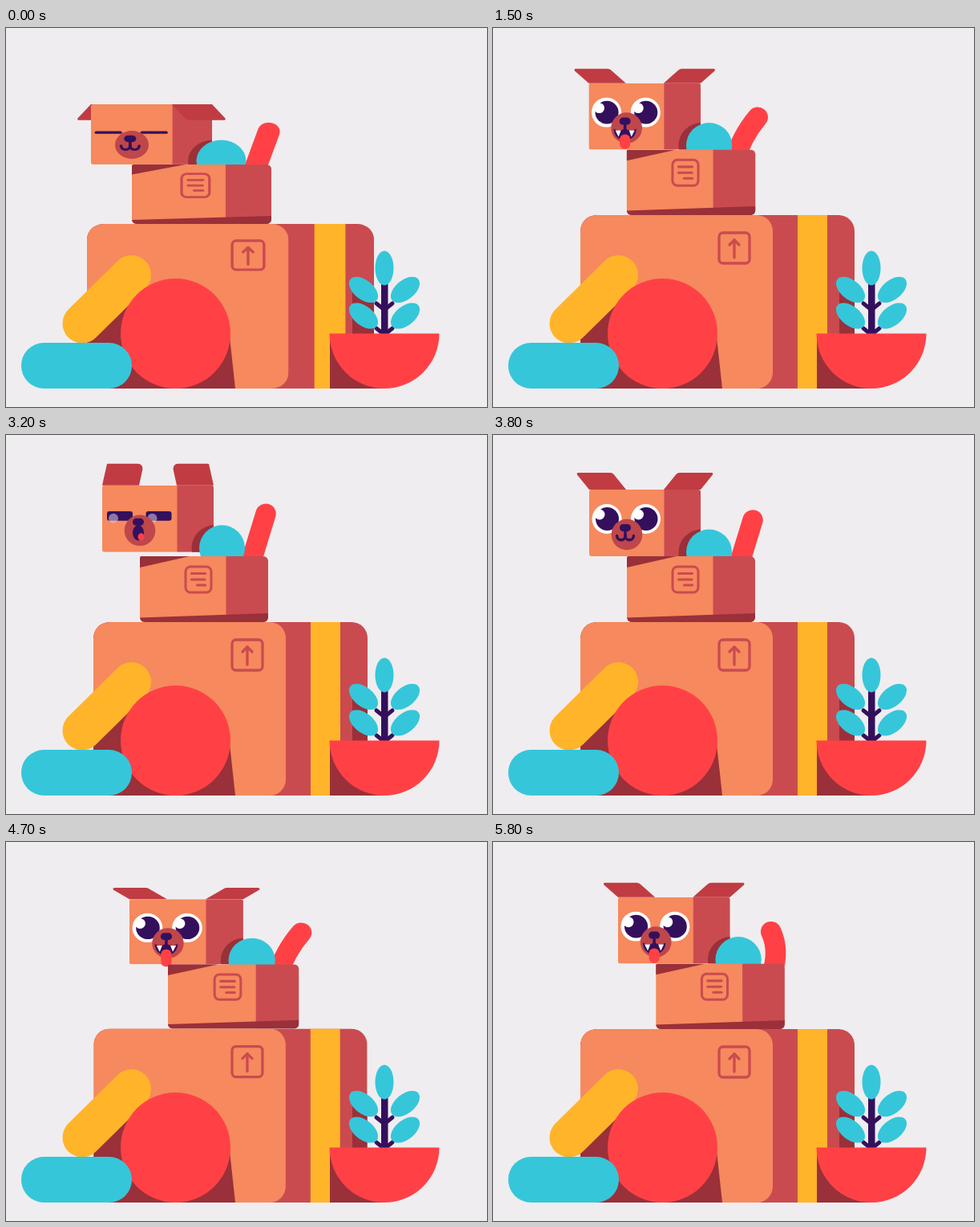
Write an HTML page with a canvas that moves like this. It is 600 px wide and 472 px high and loops after 5900 ms.

```html
<!DOCTYPE html>
<html lang="en">
<head>
<meta charset="utf-8">
<title>Box dog</title>
<style>
  html, body { margin: 0; width: 100%; height: 100%; overflow: hidden; background: #efedef; }
  canvas { display: block; }
</style>
</head>
<body>
<canvas id="stage" width="600" height="472"></canvas>
<script>
const c = document.getElementById('stage').getContext('2d');
const LOOP = 5900, STEP = 100, TAU = Math.PI * 2;
const LAND = 4500, JUMP = 4050, BARK = 2550, BARK_LENGTH = 600;
const BG = '#efedef', ORANGE = '#f6895d', SIDE = '#c94b50', FLAP = '#c03c42', SHADE = '#9a3039',
  RED = '#ff4146', BLUE = '#36c6da', YELLOW = '#ffb42a', INK = '#34105c', MUZZLE = '#bf464a', WHITE = '#fff';

const progress = (t, a, b) => Math.min(1, Math.max(0, (t - a) / (b - a)));
const hump = (t, a, b) => Math.sin(Math.PI * progress(t, a, b));
function ramp(t, a, b) {
  const u = progress(t, a, b);
  return u * u * (3 - 2 * u);
}

function pose(t) {
  const sinceLanding = t < LAND ? t : t - LAND;
  const impact = Math.exp(-sinceLanding / 70) * Math.cos(TAU * sinceLanding / 500);
  const pant = ramp(t, 500, 700) - ramp(t, 1700, 1950) + ramp(t, 4400, 4650);
  const beat = pant * Math.cos(TAU * (t - 900) / 423);
  const wag = pant * Math.sin(TAU * (t - 4600) / 320);
  const jump = hump(t, JUMP, LAND), air = 34 * jump;

  // Two barks in a row, with the ears held up throughout.
  const count = (t - BARK) / BARK_LENGTH;
  const barking = count > 0 && count < 2;
  const bark = barking ? Math.abs(Math.sin(Math.PI * count)) : 0;
  const shout = barking && count % 1 < .45;
  const alert = ramp(t, 2500, 2700) - ramp(t, 3600, 3800);

  return {
    beat, wag, air, body: impact,
    x: 247 + 36.5 * progress(t, JUMP, LAND - 50) - 3 * impact,
    squash: .0875 * impact + .014 * pant + .011 * beat + .05 * hump(t, 3800, JUMP),
    lift: 20 * bark + .2 * air,
    earX: -17 - 5 * pant - 2 * beat + 23 * alert + 8 * jump,
    earY: -21 + 5.5 * pant + 3 * beat - 4 * alert - 8 * bark - 9 * jump + 43 * impact,
    eye: shout ? .33 : ramp(sinceLanding, 80, 180),
    mouth: shout ? 'bark' : pant > .3 ? 'pant' : 'smile'
  };
}

function fill(color) { c.fillStyle = color; c.fill(); }

function rect(x, y, w, h, color) { c.fillStyle = color; c.fillRect(x, y, w, h); }

function box(x, y, w, h, r, color) {
  c.beginPath();
  c.roundRect(x, y, w, h, r);
  if (color) fill(color);
}

function oval(x, y, rx, ry, color, turn = 0) {
  c.beginPath();
  c.ellipse(x, y, rx, ry, turn, 0, TAU);
  fill(color);
}

function poly(color, ...points) {
  c.beginPath();
  points.forEach(p => c.lineTo(...p));
  fill(color);
}

function stroke(color, width) {
  c.strokeStyle = color;
  c.lineWidth = width;
  c.lineCap = c.lineJoin = 'round';
  c.stroke();
}

function line(color, width, ...points) {
  c.beginPath();
  points.forEach(p => c.lineTo(...p));
  stroke(color, width);
}

function clipped(x, y, w, h, r, draw) {
  c.save();
  box(x, y, w, h, r);
  c.clip();
  draw();
  c.restore();
}

function drawBody(squash) {
  const sx = 1 + .047 * squash, sy = 1 - .051 * squash;
  c.save();
  c.translate(280, 449);
  c.scale(sx, sy);
  c.translate(-280, -449);
  box(109, 233, 342, 216, [20, 20, 0, 0]);
  c.clip();
  rect(109, 233, 342, 216, SIDE);
  rect(380, 233, 37, 216, YELLOW);
  box(109, 233, 240, 216, 20, ORANGE);
  box(282, 255, 38, 38, 5);
  stroke(SIDE, 3.3);
  line(SIDE, 3.3, [301, 286], [301, 264]);
  line(SIDE, 3.3, [295, 270], [301, 264], [307, 270]);
  // Cast shadows keep their place while the box squashes.
  c.translate(280, 449);
  c.scale(1 / sx, 1 / sy);
  c.translate(-280, -449);
  poly(SHADE, [80, 410], [170, 320], [279, 385], [286, 449], [80, 449]);
  rect(432, 328, 40, 55, SHADE);
  c.restore();
  rect(404, 381, 68, 68, SHADE);
}

function drawToys() {
  line(YELLOW, 49, [95, 368], [156.5, 307.5]);
  oval(211.5, 380.5, 68.5, 68.5, RED);
  box(19, 392, 138, 57, 28.5, BLUE);
}

function drawPlant() {
  rect(468, 316, 8.5, 66, INK);
  for (const y of [343, 374]) line(INK, 5, [462, y], [472, y + 8], [482, y]);
  oval(472, 299, 11.5, 21.5, BLUE);
  for (const y of [326, 358.5])
    for (const d of [-1, 1]) oval(472 + 26 * d, y, 12, 21, BLUE, d * .9);
  c.beginPath();
  c.arc(472, 380.5, 68.5, 0, Math.PI);
  fill(RED);
}

// A flap hinged on the head's top edge; dir is -1 for left, 1 for right.
function drawEar(outer, dir, dx, dy) {
  const tip = outer - dir * dx, inner = outer - dir * 46;
  c.beginPath();
  c.moveTo(outer, 0);
  c.arcTo(tip, dy, tip - dir * 46, dy, 1.5);
  c.arcTo(tip - dir * 46, dy, inner, 0, 6);
  c.lineTo(inner, 0);
  fill(FLAP);
}

function drawEye(x, open) {
  if (open < .1) {
    const cx = x < 47 ? x - 2 : x + 2;
    line(INK, 3.4, [cx - 14, 39], [cx + 14, 39]);
  } else if (open < .5) {
    box(x - 16, 38 - 18 * open, 32, 36 * open, 3, INK);
    c.globalAlpha = .55;
    oval(x - 8, 41, 6, 6, '#d9cbe6');
    c.globalAlpha = 1;
  } else {
    oval(x, 36.5, 18.5, 18.5 * open, WHITE);
    oval(x + .5, 36.5, 14.5, 14.5 * open, INK);
    oval(x - 9, 31, 6.5, 6.5 * open, WHITE);
  }
}

function drawMouth(kind, beat) {
  c.save();
  c.translate(47, 56);
  oval(0, 0, 19.3, 19.3, MUZZLE);
  c.translate(-2, 0);
  box(-7, kind === 'bark' ? -15 : -13, 14, 9, 4.5, INK);
  line(INK, 3.5, [0, -7], [0, 1]);
  if (kind === 'pant') {
    c.beginPath();
    c.moveTo(-14, 1);
    c.quadraticCurveTo(-6, 6, 0, 0);
    c.quadraticCurveTo(6, 6, 14, 1);
    c.bezierCurveTo(14, 20, -14, 20, -14, 1);
    fill(INK);
    for (const d of [-1, 1]) poly(WHITE, [d * 12, 3], [d * 5, 3], [d * 8, 11]);
    box(-6.5, 8, 13, 20 + 2 * beat, 6, RED);
  } else if (kind === 'bark') {
    oval(0, 3, 7, 9.5, INK);
    oval(3.5, 8, 4, 4.5, RED);
  } else {
    for (const d of [-1, 1]) {
      c.beginPath();
      c.arc(d * 5.2, 1.5, 5.2, 0, Math.PI);
      stroke(INK, 3.4);
    }
  }
  c.restore();
}

function drawHead(p) {
  c.save();
  c.translate(-127, -165 - p.lift);
  drawEar(0, -1, p.earX, p.earY);
  clipped(0, 0, 139, 83, 3, () => {
    rect(0, 0, 94, 83, ORANGE);
    rect(93.5, 0, 46, 83, SIDE);
    oval(140, 78, 28.5, 28.5, SHADE);
  });
  drawEar(139, 1, p.earX, p.earY);
  drawEye(22, p.eye);
  drawEye(70.5, p.eye);
  drawMouth(p.mouth, p.beat);
  c.restore();
}

function drawTail(wag, lift) {
  c.beginPath();
  c.moveTo(59 - 5 * wag, -68 - lift);
  c.quadraticCurveTo(68 - 6 * wag, -98 - lift, 77 + 10 * wag - 4 * wag * wag, -127 + 5 * Math.abs(wag) - lift);
  stroke(RED, 25.5);
}

function drawTorso(shade) {
  clipped(-80, -82, 160, 82, [2, 6, 6, 6], () => {
    rect(-80, -82, 108, 82, ORANGE);
    rect(27.5, -82, 53, 82, SIDE);
    c.globalAlpha = shade;
    poly(SHADE, [-80, -82], [-18, -82], [-80, -68]);
    poly(SHADE, [-80, -5.5], [80, -11], [80, 0], [-80, 0]);
    c.globalAlpha = 1;
    box(-23, -69, 32, 32, 6);
    stroke(SIDE, 3);
    line(SIDE, 3.2, [-15.5, -60.5], [1.5, -60.5]);
    line(SIDE, 3.2, [-15.5, -53], [1, -53]);
    line(SIDE, 3.2, [-8.5, -46], [1.5, -46]);
  });
}

function draw(t) {
  const p = pose(t);
  rect(0, 0, 600, 472, BG);
  drawBody(p.body);
  drawToys();
  drawPlant();
  c.save();
  c.translate(p.x, 233 + 11 * p.body - p.air);
  c.scale(1 + p.squash, 1 - 1.1 * p.squash);
  drawHead(p);
  drawTail(p.wag, p.lift * 1.5 + p.air * .3);
  oval(22.5, -87 - p.lift, 28.5, 28.5, BLUE);
  drawTorso(Math.max(0, 1 - p.air / 10));
  c.restore();
}

const start = performance.now();
function tick() {
  const t = (performance.now() - start) % LOOP;
  draw(Math.floor(t / STEP) * STEP);
  requestAnimationFrame(tick);
}
tick();
</script>
</body>
</html>
```
